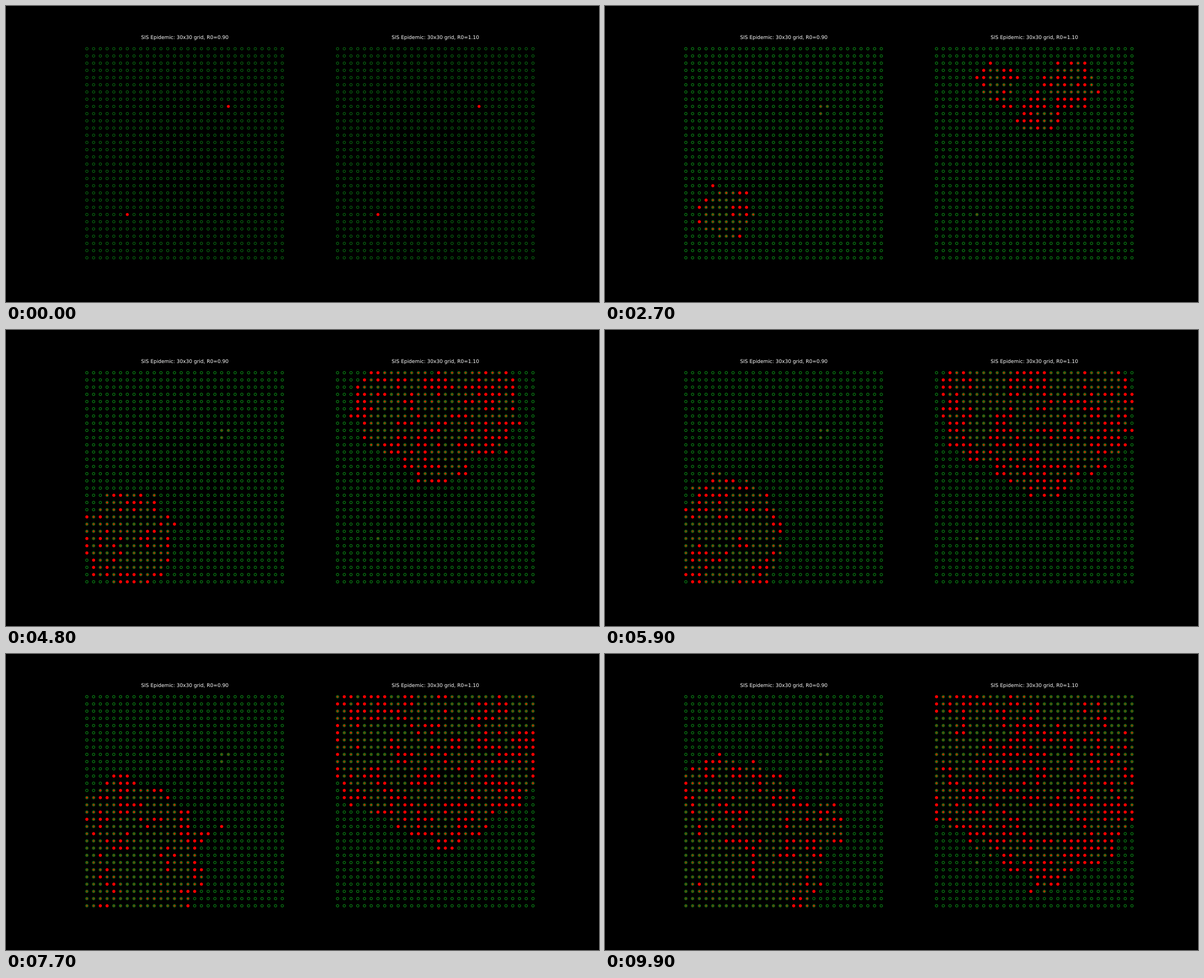
These frames come from a looping animation (1058 by 529 pixels, 10 s). A matplotlib script:

```python
import numpy as np
import matplotlib.pyplot as plt
from matplotlib.animation import FuncAnimation

N = 30          # grid side
STEPS = 100
GREEN = np.array([0.04, 0.49, 0.08])
RED = np.array([1.0, 0.0, 0.0])
BROWN = np.array([0.42, 0.22, 0.04])
row, col = np.mgrid[:N, :N]


def arrivals(rng, hubs, pace, sparks):
    """Step at which the ragged fronts around the hubs reach each cell."""
    fronts = [t + pace * np.hypot(row - r, col - c) for r, c, t in hubs]
    when = np.min(fronts, axis=0) + rng.uniform(-5, 5, (N, N))
    when = np.maximum(np.ceil(when), 1)
    for cell, t in sparks.items():
        when[cell] = t
    return when


def simulate(hubs, pace, sparks, recover, seed):
    """Steps since each cell was last infected, for every step; inf if never."""
    rng = np.random.default_rng(seed)
    when = arrivals(rng, hubs, pace, sparks)
    prone = np.ones((N, N), bool)
    for cell in sparks:
        prone[cell] = False     # first cells never fall ill again
    age = np.where(when == 0, 0, np.inf)
    history = [age]
    for t in range(1, STEPS):
        sick = age == 0
        p = np.pad(sick, 1).astype(int)
        near = p[:-2, 1:-1] + p[2:, 1:-1] + p[1:-1, :-2] + p[1:-1, 2:]
        chance = np.where(near > 0, 0.02 + 0.05 * near, 0) * prone
        again = ~sick & (when < t) & (rng.random((N, N)) < chance)
        stay = sick & (rng.random((N, N)) > recover)
        age = np.where(stay | again | (when == t), 0, age + 1)
        history.append(age)
    return history


first = {(8, 21): 0, (23, 6): 0}
runs = [
    simulate([(23, 6, 0), (15, 5, 50), (24, 13, 52), (19, 17, 70),
              (18, 20, 76)], 7, {**first, (8, 20): 4, (9, 20): 8}, 0.2, 3),
    simulate([(5, 20, 5), (9, 15, 10), (5, 9, 8), (20, 16, 66),
              (24, 16, 80), (21, 24, 86)], 6, first, 0.15, 8),
]

plt.rcParams.update({"font.family": "DejaVu Sans", "text.hinting": "none"})
fig, axes = plt.subplots(1, 2, figsize=(20, 10), dpi=52.9, facecolor="black")
fig.subplots_adjust(left=0.125, right=0.9, bottom=0.125, top=0.88, wspace=0.2)

grids = []
for ax, r0 in zip(axes, ("0.90", "1.10")):
    ax.set(xlim=(-1, N), ylim=(-1, N))
    ax.axis("off")
    ax.set_title(f"SIS Epidemic: 30x30 grid, R0={r0}", color="white",
                 fontsize=12, pad=6)
    grids.append(ax.scatter(col.ravel(), N - 1 - row.ravel(), s=36))


def draw(n):
    """Sick cells are red; healed ones keep a fading red core in a green ring."""
    width = 1.6 - 0.4 * np.exp(-n / 4)      # rings thicken as they overprint
    for grid, history in zip(grids, runs):
        age = history[n].ravel()[:, None]
        fade = np.exp(-age / 12)
        core = BROWN + (RED - BROWN) * fade
        grid.set_facecolor(np.where(np.isinf(age), 0, core))
        grid.set_edgecolor(np.where(age == 0, RED, GREEN))
        grid.set_linewidth(width)
    return grids


anim = FuncAnimation(fig, draw, frames=STEPS, interval=100, repeat=True,
                     repeat_delay=0, blit=False)
plt.show()
```
